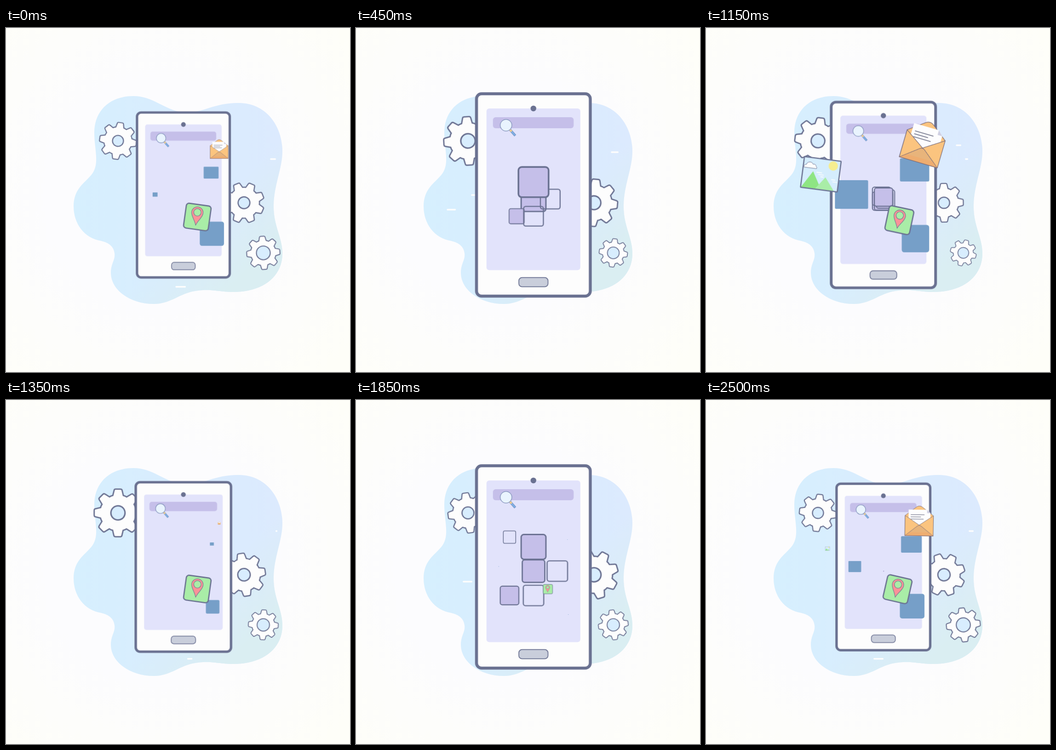
Write an HTML page without scripts that moves like this. It is 748 px wide and 748 px high and loops after 2.55 s.

```html
<!DOCTYPE html>
<html lang="en">
<head>
<meta charset="utf-8">
<title>Phone apps</title>
<style>
html, body { margin: 0; width: 100%; height: 100%; overflow: hidden; background: #fdfdfd; }
svg { display: block; width: 100vw; height: 100vh; }
.ink { stroke: #6a7191; }
.streak { fill: #fdfdfd; height: 3.6px; rx: 1.8px; }
.cycle, .tile, .streak { animation: 1275ms linear infinite; }

/* gears */
.bar { stroke-linejoin: round; }
.rim { fill: #6a7191; stroke: #6a7191; stroke-width: 9.4; }
.face { fill: #fdfdfd; stroke: #fdfdfd; stroke-width: 4; }
.hole { fill: #d8edfe; stroke: #6a7191; stroke-width: 2.9; }
#gearA { animation: gearA 425ms cubic-bezier(.37,0,.63,1) infinite alternate; }
#gearB { animation: gearB 2550ms linear infinite; }
#gearC { animation: gearC 2550ms linear infinite; }
@keyframes gearA {
  from { transform: rotate(8deg) scale(.82); }
  to { transform: rotate(-49deg) scale(1.08); }
}
@keyframes gearB {
  0%, 100% { transform: rotate(-22deg) scale(.9); }
  17.65% { transform: rotate(5deg) scale(1.05); }
  33.33% { transform: rotate(-2deg) scale(.92); }
  45.1% { transform: rotate(-1deg) scale(.86); }
  60.78% { transform: rotate(-16deg) scale(1.05); }
  72% { transform: rotate(-17deg) scale(1.08); }
  84.31% { transform: rotate(-14deg) scale(1.05); }
  98.04% { transform: rotate(-19deg) scale(.94); }
}
@keyframes gearC {
  0%, 100% { transform: rotate(-4deg) scale(.74); }
  12.9% { transform: rotate(4deg) scale(.58); }
  17.65% { transform: rotate(7deg) scale(.63); }
  33.33% { transform: rotate(14deg) scale(.73); }
  45.1% { transform: rotate(15deg) scale(.58); }
  60.78% { transform: rotate(-9deg) scale(.75); }
  84.31% { transform: rotate(-5deg) scale(.58); }
  98.04% { transform: rotate(-6deg) scale(.755); }
}

/* phone and its blue panels */
#phone { animation-name: phone; animation-timing-function: ease-in-out; }
@keyframes phone {
  0%, 1.6%, 98.4%, 100% { transform: scale(.815); }
  19.6%, 83.1% { transform: scale(1); }
}
#panelPic { animation-name: panelPic; }
@keyframes panelPic {
  0%, 100% { transform: scale(.185); }
  2%, 45% { transform: scale(0); }
  57%, 68.6% { transform: scale(1); }
  90.2% { transform: scale(1.07); }
  96.08% { transform: scale(.46); }
}
#panelMail { animation-name: panelMail; }
@keyframes panelMail {
  0%, 100% { transform: scale(.6); }
  8%, 45% { transform: scale(0); }
  57%, 66.7% { transform: scale(1); }
  90.2% { transform: scale(1.04); }
  96.08% { transform: scale(.82); }
}
#panelPin { animation-name: panelPin; }
@keyframes panelPin {
  0%, 57%, 100% { transform: scale(1); }
  13%, 45% { transform: scale(0); }
}

/* app tiles burst from the centre: --x --y place, --p early progress, --a --b early sizes */
.tile { animation-name: tile; stroke: #6a7191; stroke-width: 2.5; fill: none; }
.tile.full { fill: #c5bfe9; }
@keyframes tile {
  0%, 10%, 97%, 100% { transform: scale(0); }
  21.57% { transform: translate(calc(var(--x) * var(--p)), calc(var(--y) * var(--p))) scale(var(--a)); }
  35.29% { transform: translate(calc(var(--x) * .58), calc(var(--y) * .58)) scale(var(--b)); }
  52%, 66.67% { transform: translate(var(--x), var(--y)) scale(1); }
  68.63% { transform: translate(calc(var(--x) * .96), calc(var(--y) * .96)) scale(1.14); }
  90.2% { transform: translate(calc(var(--x) * .07), calc(var(--y) * .07)) scale(.88); }
  96.08% { transform: scale(.03); }
}

/* floating items */
#pin { animation-name: pin; }
@keyframes pin {
  0%, 100% { transform: translate(416px,411px) rotate(8deg) scale(1.19); }
  12% { transform: translate(400px,392px) scale(0); }
  38% { transform: translate(386px,372px) scale(0); }
  54%, 66.67% { transform: translate(455.5px,459.5px) scale(1); }
  68.63% { transform: translate(448px,451px) scale(1.22); }
  90.2% { transform: translate(420.5px,418px) rotate(12deg) scale(1.2); }
  96.08% { transform: translate(416.5px,411.5px) rotate(13deg) scale(1.19); }
}
#mail { animation-name: mail; }
@keyframes mail {
  0%, 100% { transform: translate(463.5px,269.5px) scale(.6); }
  7% { transform: translate(463.5px,268px) scale(0); }
  45% { transform: translate(466px,295px) scale(0); }
  57%, 66.67% { transform: translate(470.5px,287px) rotate(-1.5deg) scale(1); }
  68.63% { transform: translate(478px,272px) rotate(-9deg) scale(1.05); }
  90.2% { transform: translate(470.5px,262px) rotate(16.5deg) scale(1.31); }
  96.08% { transform: translate(463.5px,273px) rotate(1deg) scale(.94); }
}
#pic { animation-name: pic; }
@keyframes pic {
  0%, 45%, 98%, 100% { transform: translate(264px,324px) scale(0); }
  57%, 66.67% { transform: translate(254px,325px) rotate(-13deg) scale(1); }
  68.63% { transform: translate(245px,319.5px) rotate(-14.5deg) scale(1); }
  90.2% { transform: translate(249.5px,318px) rotate(7.5deg) scale(1.1); }
  96.08% { transform: translate(264px,323px) scale(.14); }
}

/* streaks */
@keyframes right1 {
  0%, 100% { x: 574px; width: 13px; }
  9% { x: 592px; width: 0; }
  9.1%, 55% { x: 520px; width: 0; }
  66.67% { x: 534px; width: 31px; }
  68.63% { x: 545px; width: 20px; }
  90.2% { x: 563px; width: 7px; }
  96.08% { x: 571px; width: 11px; }
}
@keyframes right2 {
  0%, 10% { x: 510px; width: 0; }
  21.57% { x: 513px; width: 67px; }
  35.29% { x: 554px; width: 17px; }
  43%, 100% { x: 576px; width: 0; }
}
@keyframes right3 {
  0%, 66.7% { x: 514px; width: 0; }
  68.63% { x: 518px; width: 7px; }
  90.2% { x: 543px; width: 12px; }
  96%, 100% { x: 562px; width: 0; }
}
@keyframes left1 {
  0%, 11% { x: 200px; width: 0; }
  21.57% { x: 222px; width: 40px; }
  35.29% { x: 250px; width: 12px; }
  40%, 100% { x: 264px; width: 0; }
}
@keyframes left2 {
  0%, 55% { x: 190px; width: 0; }
  66.67% { x: 198px; width: 41px; }
  68.63% { x: 211px; width: 26px; }
  84%, 100% { x: 262px; width: 0; }
}
@keyframes left3 {
  0%, 31% { x: 188px; width: 0; }
  35.29% { x: 197px; width: 20px; }
  44% { x: 228px; width: 24px; }
  54%, 100% { x: 262px; width: 0; }
}
@keyframes bottom {
  0%, 100% { x: 368px; width: 23px; }
  12% { x: 420px; width: 0; }
  12.1%, 90.2% { x: 340px; width: 0; }
  96.08% { x: 364px; width: 22px; }
}
</style>
</head>
<body>
<svg viewBox="0 0 748 748">
  <defs>
    <radialGradient id="paper" cx=".45" cy=".48" r=".72">
      <stop offset=".45" stop-color="#fcfcfe"/><stop offset="1" stop-color="#fefef8"/>
    </radialGradient>
    <linearGradient id="sky" x1="0" x2="1">
      <stop offset="0" stop-color="#d6effe"/><stop offset="1" stop-color="#dceafe"/>
    </linearGradient>
    <linearGradient id="mint" x1=".6" y1=".6" x2="1" y2="1">
      <stop offset="0" stop-color="#daeef2" stop-opacity="0"/><stop offset=".6" stop-color="#daeef2"/>
    </linearGradient>
    <path id="blob" d="M277 148C320 148 340 176 385 184C430 186 450 162 508 163C565 164 601 212 601 268C601 305 583 340 582 385C581 430 601 455 601 490C601 540 560 575 490 574C450 572 440 566 405 573C375 580 355 600 322 600C270 600 228 570 228 532C228 512 238 504 236 490C234 470 215 465 207 463C170 457 147 425 147 388C147 350 170 338 185 320C205 297 192 265 192 228C192 180 225 148 277 148Z"/>
    <path id="bar" d="M-5-45.5H5L8-33V33L5 45.5H-5L-8 33V-33Z"/>
    <g id="cog" class="bar">
      <circle r="34"/>
      <use href="#bar"/>
      <use href="#bar" transform="rotate(45)"/>
      <use href="#bar" transform="rotate(90)"/>
      <use href="#bar" transform="rotate(135)"/>
    </g>
    <g id="gear"><use href="#cog" class="rim"/><use href="#cog" class="face"/></g>
    <rect id="square" x="-22.8" y="-22.8" width="45.6" height="45.6" rx="5"/>
  </defs>

  <rect width="748" height="748" fill="url(#paper)"/>
  <use href="#blob" fill="url(#sky)"/>
  <use href="#blob" fill="url(#mint)"/>

  <rect class="streak" y="283.2" style="animation-name:right1"/>
  <rect class="streak" y="268.2" style="animation-name:right2"/>
  <rect class="streak" y="253.2" style="animation-name:right3"/>
  <rect class="streak" y="361.4" style="animation-name:left1"/>
  <rect class="streak" y="379" style="animation-name:left2"/>
  <rect class="streak" y="393.2" style="animation-name:left3"/>
  <rect class="streak" y="561" style="animation-name:bottom"/>

  <g transform="translate(243.5 245.5)"><g id="gearA"><use href="#gear"/><circle class="hole" r="14.5"/></g></g>
  <g transform="translate(517.5 380)"><g id="gearB"><use href="#gear"/><circle class="hole" r="14.2"/></g></g>
  <g transform="translate(559.5 489)"><g id="gearC"><use href="#gear"/><circle class="hole" r="20.3"/></g></g>

  <g transform="translate(385.7 363)">
    <g id="phone" class="cycle">
      <rect class="ink" x="-123.7" y="-220" width="247.4" height="440" rx="11" fill="#fdfdfd" stroke-width="6.4"/>
      <rect x="-102" y="-188" width="204" height="351.5" rx="6" fill="#e2e3fb"/>
      <circle cy="-188" r="6.2" fill="#6a7191"/>
      <rect x="-88" y="-169" width="175.5" height="24" rx="6" fill="#c5bfe9"/>
      <rect class="ink" x="-31.7" y="179.7" width="63.4" height="20" rx="7" fill="#c9cedb" stroke-width="1.8"/>
      <path d="M-51-142l11.500 13" stroke="#6a86b8" stroke-width="5"/>
      <path d="M-51-142l11 12.500" stroke="#7fb2e6" stroke-width="3.400"/>
      <path d="M-51-142l3.500 4" stroke="#f4cf8c" stroke-width="4"/>
      <circle cx="-59.500" cy="-151.500" r="12.600" fill="#e9f4fe" stroke="#7f8fb8" stroke-width="1.300"/>
      <g fill="#769fc8">
        <g transform="translate(-75.500 -1)"><rect id="panelPic" class="cycle" x="-37" y="-32" width="74" height="64" rx="3"/></g>
        <g transform="translate(74 -59.500)"><rect id="panelMail" class="cycle" x="-33.500" y="-26.500" width="67" height="53" rx="3"/></g>
        <g transform="translate(76 103.500)"><rect id="panelPin" class="cycle" x="-32.500" y="-32.500" width="65" height="65" rx="6"/></g>
      </g>
    </g>
  </g>

  <g transform="translate(386 372)">
    <use href="#square" class="tile full" style="--x:0px;--y:0px;--p:0;--a:.94;--b:1.18"/>
    <use href="#square" class="tile full" style="--x:-63px;--y:64px;--p:0;--a:0;--b:.72"/>
    <use href="#square" class="tile" style="--x:62.5px;--y:0px;--p:.33;--a:1.07;--b:.94"/>
    <use href="#square" class="tile" style="--x:0px;--y:64px;--p:.34;--a:1.27;--b:.94"/>
    <use href="#square" class="tile" style="--x:-63px;--y:-89px;--p:0;--a:0;--b:0"/>
    <use href="#square" class="tile full" style="--x:0px;--y:-63.5px;--p:0;--a:0;--b:1.44"/>
  </g>

  <g id="pin" class="cycle ink">
    <use href="#square" fill="#a9eda7" stroke-width="2.2"/>
    <path d="M-1 15.500C-3 7-11.500 0-11.500-8A10.500 10.500 0 0 1 9.500-8C9.500 0 1 7-1 15.500Z" fill="#fa9298" stroke-width=".9"/>
    <circle cx="-1" cy="-8.500" r="6.700" fill="#a9eda7" stroke-width=".9"/>
  </g>

  <g id="mail" class="cycle" stroke="#756878" stroke-width=".9" stroke-linejoin="round">
    <path d="M-33-23L-7-43Q0-48 7-43L33-23V24H-33Z" fill="#fbc47f"/>
    <path d="M-25-37H18L26-29V10H-25Z" fill="#fdfdfe" stroke="none"/>
    <path d="M18-37V-29H26Z" fill="#cfcfe2" stroke="none"/>
    <path d="M-20-25H12M-20-20H4M-20-15H10" stroke="#5d6078" stroke-width="1.100"/>
    <path d="M-33-23L0-1V24H-33ZM33-23L0-1V24H33Z" fill="#fbc47f" stroke="none"/>
    <path d="M-33 24L-4 1Q0-2 4 1L33 24Z" fill="#e8b47b"/>
    <path d="M-33 24L-22 16H22L33 24Z" fill="#f3a869" stroke="none" opacity=".6"/>
    <path d="M-33-23L0-1L33-23V24H-33Z" fill="none"/>
  </g>

  <g id="pic" class="cycle">
    <rect x="-37" y="-31" width="74" height="62" fill="#d5edfd"/>
    <circle cx="22.500" cy="-19.500" r="9.300" fill="#f6ee90"/>
    <path d="M-36 30L-16-4L4 30Z" fill="#8ee583"/>
    <path d="M-8 30L10 5L30 30Z" fill="#a9eda7"/>
    <path d="M-35-10a4 4 0 0 1 4-6a7 7 0 0 1 13-2a5 5 0 0 1 7 4a3 3 0 0 1 1 4Z" fill="#fdfdfd" stroke="#6a7191" stroke-width=".9"/>
    <path d="M-9-3h11M-5 1h11M0 5h6M22 8h8M25 12h9" stroke="#fdfdfd" stroke-width="1.500"/>
    <rect class="ink" x="-37" y="-31" width="74" height="62" rx="1" fill="none" stroke-width="2.300"/>
  </g>
</svg>
</body>
</html>
```
